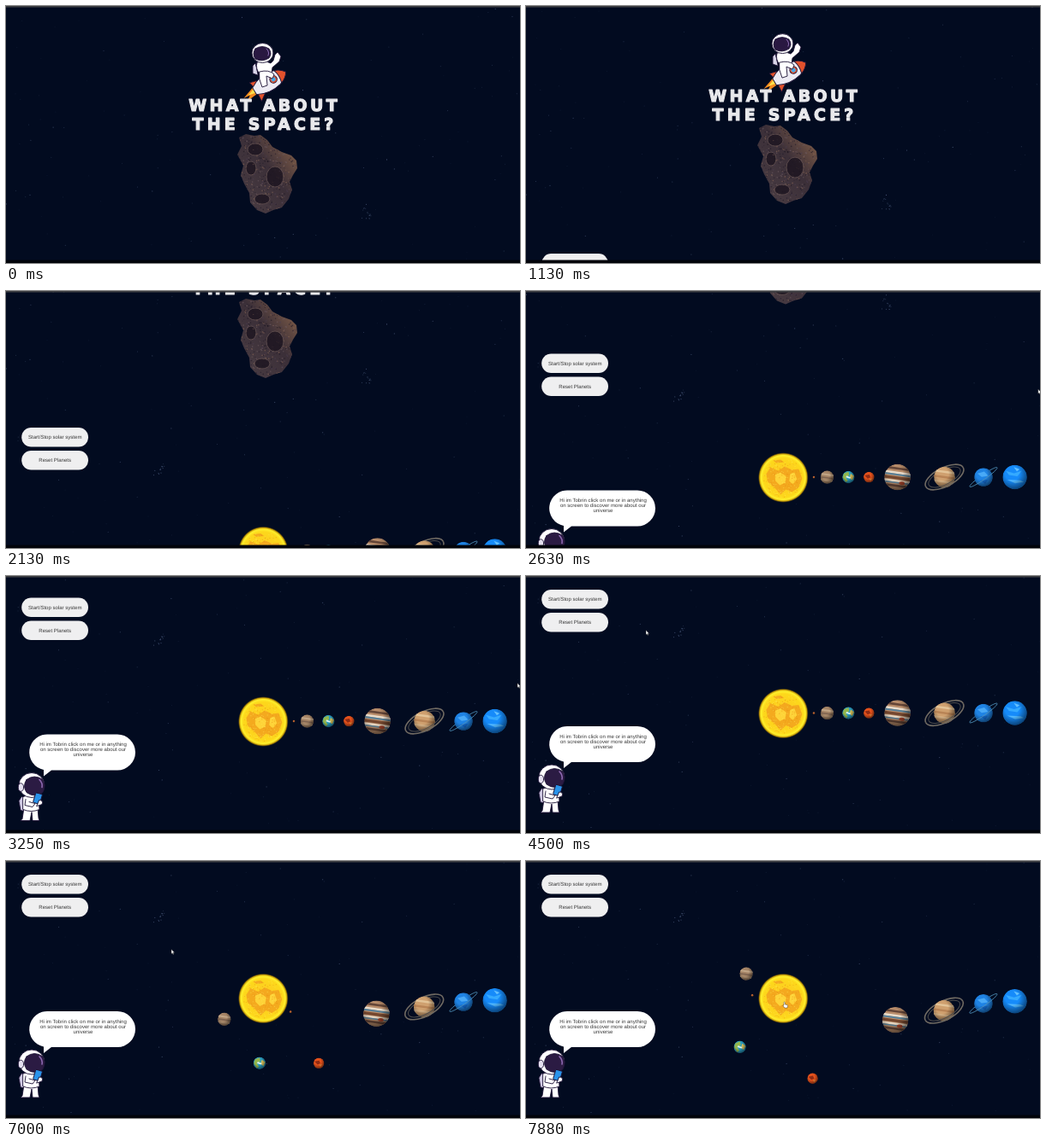
These frames come from a looping animation (600 by 301 pixels, 8 s). An HTML page:

```html
<!DOCTYPE html>
<html lang="en">
<head>
<meta charset="utf-8">
<title>What about the space?</title>
<style>
html, body { margin: 0; width: 100%; height: 100%; overflow: hidden; background: #020b20; }
svg { display: block; width: 100%; height: 100%; }
text { text-anchor: middle; font: 6.05px "Liberation Sans", Arial, sans-serif; fill: #383838; text-rendering: geometricPrecision; }
.title { font: bold 19px "DejaVu Sans", sans-serif; fill: #e9e9ec; stroke: #e9e9ec; stroke-width: 1.1; stroke-linejoin: round; }
.ink { stroke: #1d1436; stroke-width: .9; stroke-linejoin: round; stroke-linecap: round; }
</style>
</head>
<body>
<svg viewBox="0 0 600 301">
<defs>
  <radialGradient id="shade" cx=".4" cy=".35" r=".65">
    <stop offset=".45" stop-color="#000" stop-opacity="0"/>
    <stop offset="1" stop-color="#000" stop-opacity=".5"/>
  </radialGradient>
  <radialGradient id="sun">
    <stop offset="0" stop-color="#fdc524"/>
    <stop offset=".78" stop-color="#fdd81b"/>
    <stop offset=".88" stop-color="#fff02c"/>
    <stop offset=".94" stop-color="#c69a08"/>
    <stop offset="1" stop-color="#3a2c08" stop-opacity="0"/>
  </radialGradient>
  <linearGradient id="rock" x1="0" y1="1" x2="1" y2="0">
    <stop offset="0" stop-color="#4c3f45"/>
    <stop offset=".55" stop-color="#3b2f38"/>
    <stop offset="1" stop-color="#91694c"/>
  </linearGradient>
  <clipPath id="rockClip"><use href="#rockShape"/></clipPath>
  <clipPath id="unit"><circle r="1"/></clipPath>
</defs>
<rect width="600" height="301" fill="#020b20"/>
<g id="page">
  <g id="stars"></g>

  <g id="rider" class="ink" fill="#fff">
    <g transform="translate(307 89) rotate(-31)">
      <path d="M-20 -4L-35 1L-27 2L-33 6L-20 5Z" fill="#f58b1f" stroke="none"/>
      <path d="M-20 -2L-29 1L-20 3Z" fill="#ffe04a" stroke="none"/>
      <path d="M-9 -8L-20 -11L-18 -2ZM-9 8L-19 15L-18 3Z" fill="#e2512c"/>
      <path d="M-20 -4Q-6 -13 10 -9Q19 -6 23 0Q19 6 10 9Q-6 13 -20 5Z" fill="#eceaf3"/>
      <path d="M12 -8.500Q19 -6 23 0Q19 6 12 8.500Q15 0 12 -8.500Z" fill="#e2512c"/>
      <circle cx="6" r="4.300" fill="#e2512c"/><circle cx="6" r="2.500" fill="#45a9e8" stroke="none"/>
    </g>
    <path d="M291 67L288 70V79L294 81Z" fill="#d8d5e8"/>
    <path d="M293 66Q301 63 309 67L312 64L314 57L317 54L321 59L319 65L311 72L310 79H296Q291 74 293 66Z"/>
    <path d="M296 77Q307 74 313 80L311 85L304 82L305 93L299 95L296 86Z"/>
    <ellipse cx="299.500" cy="55" rx="12.500" ry="11.500"/>
    <path d="M291 50Q299 45 307 50Q311 56 307 61Q299 66 291 62Q287 56 291 50Z" fill="#291841"/>
    <path d="M304 50Q308 54 306 58" stroke="#9877bf" fill="none"/>
  </g>

  <text class="title" x="301.700" y="123" letter-spacing="3.350">WHAT ABOUT</text>
  <text class="title" x="302.100" y="145" letter-spacing="4.200">THE SPACE?</text>

  <path id="rockShape" fill="url(#rock)" d="M272 154L280 150L290 152L297 151L305 157L311 165L322 171L333 175L339 181L340 190L335 198L331 206L334 215L330 226L322 236L312 239L303 243L293 239L285 230L284 219L278 208L274 198L277 187L270 174L275 164Z"/>
  <g id="grit" clip-path="url(#rockClip)"></g>

  <g id="buttons"></g>

  <path fill="#fff" d="M50 461H130A21 21 0 0 1 130 503H53L44 510V502.500A21 21 0 0 1 50 461Z"/>
  <text x="90" y="474.700">Hi im Tobrin click on me or in anything</text>
  <text x="90" y="480.700">on screen to discover more about our</text>
  <text x="90" y="486.700">universe</text>

  <g id="guide" class="ink" fill="#fff" transform="translate(0 285)">
    <path d="M18 249L15 254L17 265L22 266V250Z" fill="#cfc9e2"/>
    <path d="M21 262L19 275L17 277H28L30 267L31 277H39L38 274L37 262Z"/>
    <path d="M20 249Q29 245 38 249L39 264Q29 268 20 264Z"/>
    <ellipse cx="30" cy="235.500" rx="15" ry="14.500"/>
    <path d="M24 229Q33 222 43 229Q47 237 43 244Q34 251 24 244Q19 236 24 229Z" fill="#2b1b43"/>
    <path d="M39 229Q43 233 42 238" fill="none" stroke="#8d68b0" stroke-width="1.600"/>
    <ellipse cx="17.500" cy="238" rx="3.200" ry="4.800" fill="#e5e0f0"/>
    <path d="M23 252L22 259L31 261L34 257L27 255"/>
    <rect x="33" y="245" width="8" height="12" rx="1.200" fill="#2993ea" transform="rotate(17 37 251)"/>
    <path d="M39 253Q44 253 42 258L36 260Z"/>
  </g>

  <g transform="translate(300.300 446)">
    <circle r="29.500" fill="url(#sun)"/>
    <path fill="#f3a01f" opacity=".8" d="M-15 -12L-6 -8L2 -13L10 -9L18 -10L22 1L18 12L10 17L3 14L-3 20L-10 12L-18 5L-20 -4ZM-12 -20L-3 -21L1 -18L-8 -17Z"/>
    <path fill="#ffda3d" opacity=".85" d="M-10 -3L-3 -6L4 -1L2 6L-4 9L-9 4ZM8 -4L13 -6L16 2L11 8L7 4Z"/>
    <g id="spots"></g>
  </g>
  <g id="planets"></g>
</g>

<rect width="600" height="1.600" fill="#3d3e41"/>
<rect y="297.500" width="600" height="3.500" fill="#02040a"/>
<g id="cursor" fill="#fff" stroke="#222" stroke-width=".4">
  <path id="arrow" d="M0 0V5.200L1.200 4.200L2 6L2.900 5.600L2.100 3.900H3.700Z"/>
  <path id="hand" d="M0 .6Q.7 -.4 1.300 .6V3L4 3.500Q4.700 3.800 4.500 5L4 7H.9L-1 4.500Q-1 3.700 0 4.200Z"/>
</g>
</svg>
<script>
const $ = id => document.getElementById(id);
let seed = 41;
const rnd = () => (seed = seed * 16807 % 2147483647) / 2147483647;
const around = (c, spread) => c + (rnd() + rnd() - 1) * spread;
const dot = (x, y, r, fill, op = 1) =>
  `<circle cx="${x.toFixed(1)}" cy="${y.toFixed(1)}" r="${r}" fill="${fill}" opacity="${op.toFixed(2)}"/>`;
const many = (n, make) => Array.from({ length: n }, make).join('');

// Sky: even dust plus two faint clusters
const star = (x, y, op) => dot(x, y, .55, '#8fa5d0', op);
$('stars').innerHTML =
  many(230, () => star(rnd() * 600, rnd() * 590, .08 + rnd() ** 3 * .4)) +
  many(14, () => star(around(422, 9), around(242, 11), .2 + rnd() * .35)) +
  many(14, () => star(around(180, 9), around(352, 11), .2 + rnd() * .35));

const grains = ['#6d5b60', '#241b2b', '#8d6a58', '#4a3d52', '#1d1722'];
const crater = (x, y, rx, ry) =>
  `<ellipse cx="${x}" cy="${y}" rx="${rx}" ry="${ry}" fill="#1c1520" opacity=".8" stroke="#6f5b58" stroke-width=".8"/>`;
$('grit').innerHTML =
  many(420, () => dot(268 + rnd() * 74, 149 + rnd() * 95, .8, grains[rnd() * 5 | 0], .6)) +
  crater(291, 168, 9, 7) + crater(314, 200, 10, 12) + crater(299, 226, 9, 6) + crater(286, 190, 6, 8) +
  many(90, () => dot(268 + rnd() * 74, 149 + rnd() * 95, .6, grains[rnd() * 5 | 0], .5));

$('spots').innerHTML = many(170, () => {
  const a = rnd() * 6.283, r = Math.sqrt(rnd()) * 23;
  return dot(r * Math.cos(a), r * Math.sin(a), .6, rnd() < .5 ? '#ffe95a' : '#e88d14', .5);
});

$('buttons').innerHTML = [['Start/Stop solar system', 301], ['Reset Planets', 328]].map(([label, y]) =>
  `<rect x="18.200" y="${y}" width="77.800" height="22.500" rx="11.200" fill="#efeff0"/>
   <text x="57.200" y="${y + 13.2}">${label}</text>`).join('');

// Planets: orbit radius, period in years, size, base colour, surface on a unit disc, ring
const stripe = (y, h, c) => `<rect x="-1" y="${y}" width="2" height="${h}" fill="${c}"/>`;
const patch = (d, c) => `<path d="${d}" fill="${c}"/>`;
const ring = (rx, ry, tilt, c, w) => half =>
  `<path d="M${-rx} 0A${rx} ${ry} 0 0 ${half} ${rx} 0" transform="rotate(${tilt})" fill="none" stroke="${c}" stroke-width="${w}"/>`;
const bodies = [
  [36, .2408, 1.5, '#b9622f', ''],
  [51.5, .615, 7.7, '#a58466', stripe(-.5, .25, '#c2a687') + stripe(0, .2, '#7d6350') + stripe(.4, .25, '#bb9a78')],
  [76.3, 1, 7.2, '#2a9cc0', patch('M-.8 -.5L-.1 -.9L.1 -.3L-.4 .1L0 .6L-.3 .9L-.9 .2Z', '#93b64c') +
    patch('M.3 -.6L.9 -.3L.7 .4L.2 .1Z', '#d3bd58') + patch('M-.3 -.2L.4 0L.3 .2L-.4 .1Z', '#d7f0ee')],
  [100.3, 1.88, 6.3, '#e4511c', patch('M-.8 -.2L0 -.5L.3 0L-.2 .3Z', '#8f2a13') + patch('M.1 .3L.7 .1L.4 .7Z', '#fb8b35')],
  [133.6, 11.86, 15.2, '#b98d6b', stripe(-.75, .17, '#654638') + stripe(-.42, .17, '#e9dccb') +
    stripe(-.25, .13, '#56809a') + stripe(-.05, .22, '#74472f') + stripe(.22, .16, '#e5d6c2') +
    stripe(.38, .1, '#56809a') + stripe(.58, .17, '#68483a') +
    '<ellipse cx=".4" cy=".43" rx=".22" ry=".13" fill="#a5432b"/>'],
  [188.5, 29.46, 12.3, '#cfa06f', stripe(-.6, .2, '#e3c397') + stripe(-.1, .2, '#b98456') + stripe(.35, .2, '#dfb98b'),
    [ring(24.5, 11, -27, '#706a62', 1.6), ring(20.5, 8.5, -27, '#4d4b4b', 1)]],
  [234, 84, 10.8, '#1f83e4', patch('M-.7 -.3L0 -.6L.5 -.2L-.2 0Z', '#49a9f6') + patch('M-.3 .4L.5 .2L.3 .7Z', '#1568c9'),
    [ring(19.5, 2.8, -35, '#4f8fb7', .8)]],
  [270.6, 164.8, 14.2, '#168bfa', patch('M-.8 -.4L-.1 -.3L.5 -.6L.2 -.1L-.5 -.1Z', '#35aaff') +
    patch('M-.6 .3L.5 .2L.8 .3L.1 .5Z', '#50b7ff') + patch('M-.2 -.8L.3 -.7L.1 -.5Z', '#63c0ff')]
];
$('planets').innerHTML = bodies.map(([, , size, base, skin, rings = []]) =>
  `<g>${rings.map(r => r(1)).join('')}
   <g transform="scale(${size})" clip-path="url(#unit)"><circle r="1" fill="${base}"/>
   <g transform="rotate(8)">${skin}</g><circle r="1" fill="url(#shade)"/></g>
   ${rings.map(r => r(0)).join('')}</g>`).join('');
const planets = [...$('planets').children];

// Rows are [time, ...values], joined by straight runs
const scrollKeys = [[1000, 0], [1625, 54.5], [2625, 227.5], [3250, 275.5], [3700, 285]];
const cursorKeys = [[1900, 606, 100], [2500, 598, 113], [3250, 597, 125.5], [3600, 597, 125.5], [4300, 140, 63.5],
  [4500, 140, 63.5], [4850, 58, 26.5], [6500, 58, 26.5], [7400, 301, 165]];
function at(keys, t) {
  const i = keys.findIndex(k => k[0] > t);
  if (i < 1) return keys.at(i).slice(1);
  const a = keys[i - 1], b = keys[i], f = (t - a[0]) / (b[0] - a[0]);
  return a.slice(1).map((v, j) => v + (b[j + 1] - v) * f);
}

const loop = 8000, step = 125, launch = 4870, yearRate = 43.7;
function draw(now) {
  const t = Math.floor(now % loop / step) * step;
  const [scroll] = at(scrollKeys, t), [x, y] = at(cursorKeys, t);
  $('page').setAttribute('transform', `translate(0 ${-scroll})`);
  const years = Math.max(0, t - launch) / 1000 * yearRate;
  bodies.forEach(([orbit, period], i) => {
    const a = years / period * Math.PI / 180;
    planets[i].setAttribute('transform',
      `translate(${300 + orbit * Math.cos(a)} ${445.5 + orbit * Math.sin(a)})`);
  });
  const onButton = x > 18 && x < 96 && y > 16 && y < 65;
  const onSun = Math.hypot(x - 300, y + scroll - 446) < 28;
  const pointing = onButton || onSun;
  $('cursor').setAttribute('transform', `translate(${x} ${y})`);
  $('hand').style.display = pointing ? '' : 'none';
  $('arrow').style.display = pointing ? 'none' : '';
  requestAnimationFrame(draw);
}
draw(0);
</script>
</body>
</html>
```
